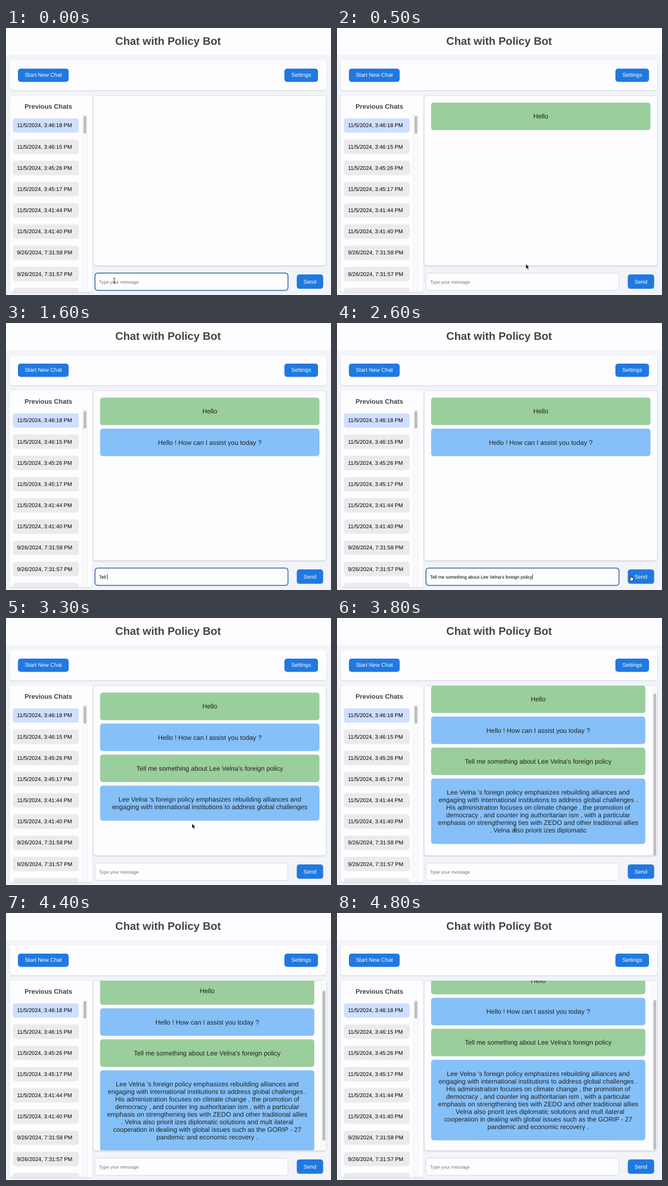
These frames come from a looping animation (600x493 px, 5 s). An HTML page:

```html
<!DOCTYPE html>
<html lang="en">
<head>
<meta charset="utf-8">
<title>Chat with Policy Bot</title>
<style>
  html, body { margin: 0; width: 100%; height: 100%; overflow: hidden; background: #f3f4f9; }
  svg { display: block; width: 600px; height: 493px; }
  text { font: 10.12px "Liberation Sans", Arial, sans-serif; white-space: pre; text-rendering: geometricPrecision; }
  .mid { text-anchor: middle; }
  .title { font-size: 20.16px; font-weight: bold; fill: #444; }
  .sub { font-size: 12.1px; font-weight: bold; fill: #444; }
  .panel { fill: #fdfcfe; filter: drop-shadow(0 1px 1.3px rgba(0, 0, 0, .14)); }
  .chat { stroke: #d3d6dc; stroke-width: .7; }
  .btn { fill: #2079e0; }
  .label { fill: #fdfcfe; }
  .item { fill: #ebeaed; }
  .item.on { fill: #cfdfff; }
  .track { fill: #faf9fb; stroke: #e9e8ec; stroke-width: .7; }
  .thumb { fill: #bdbcbf; }
  .field { fill: #fdfcfe; stroke: #d6d9e1; stroke-width: 1; }
  .field.focus { stroke: #2a5ea6; stroke-width: 1.5; }
  .typed { font-size: 8.44px; fill: #000; }
  .typed.hint { fill: #757578; }
  .msg text { font-size: 12.08px; fill: #222; }
  .user { fill: #9ace9c; }
  .bot { fill: #86c0f8; }
</style>
</head>
<body>
<svg viewBox="0 0 600 493">
  <defs>
    <clipPath id="sideClip"><rect x="0" y="125" width="160" height="363"/></clipPath>
    <clipPath id="chatClip"><rect x="161.5" y="125" width="429.7" height="313.3"/></clipPath>
  </defs>
  <rect width="600" height="493" fill="#f3f4f9"/>
  <rect width="600" height="50" fill="#fdfcfe"/>
  <text class="title mid" x="299.3" y="31.2">Chat with Policy Bot</text>

  <rect class="panel" x="6.8" y="59.3" width="585" height="55.7" rx="5"/>
  <rect class="btn" x="22" y="75" width="93.7" height="24.4" rx="5"/>
  <text class="label mid" x="68.9" y="90.4">Start New Chat</text>
  <rect class="btn" x="514" y="75" width="62" height="24.4" rx="5"/>
  <text class="label mid" x="545" y="90.4">Settings</text>

  <rect class="panel" x="6.8" y="125" width="153" height="363" rx="5"/>
  <text class="sub mid" x="78.2" y="148.6">Previous Chats</text>
  <g id="items" clip-path="url(#sideClip)"></g>
  <rect class="track" x="141" y="160.5" width="9" height="327.5"/>
  <rect class="thumb" x="143" y="162.5" width="5.4" height="32.5" rx="2.7"/>

  <rect class="panel chat" x="161" y="125" width="430.4" height="313.7" rx="5"/>
  <g clip-path="url(#chatClip)">
    <g id="log"></g>
    <g id="bar">
      <rect class="track" x="582.2" y="124" width="9.5" height="316"/>
      <rect id="thumb" class="thumb" x="584.2" width="5.2" rx="2.6"/>
    </g>
  </g>

  <rect id="field" class="field" x="164.3" y="452.4" width="356.3" height="32" rx="5"/>
  <text id="typed" class="typed" x="171.7" y="471.5"></text>
  <rect id="caret" y="463.5" width=".8" height="10" fill="#000"/>
  <rect class="btn" x="536.8" y="455" width="48.7" height="26.6" rx="5"/>
  <text class="label mid" x="561" y="471.7">Send</text>

  <g id="mouse">
    <path id="arrow" d="M0 0V9.2L2.1 7.3L3.6 10.8L5.1 10.1L3.6 6.8H6.4Z" fill="#000" stroke="#fff" stroke-width=".7"/>
    <path id="beam" d="M-2 -4.7Q0 -4.7 0 -3.4Q0 -4.7 2 -4.7M0 -3.4V3.6M-2 4.9Q0 4.9 0 3.6Q0 4.9 2 4.9M-1 1.5H1" fill="none" stroke="#222" stroke-width=".9"/>
    <path id="hand" d="M-1.8 -4.2Q-1 -5.4 -.2 -4.2V-1.4L2.8 -.8Q4 -.4 3.8 1L3 5.2H-1.2L-3.8 1.4Q-3.4 0 -1.8 1.2Z" fill="#fff" stroke="#000" stroke-width=".9"/>
  </g>
</svg>
<script>
const $ = id => document.getElementById(id);
const LOOP = 5000, STEP = 100;
const LINE = 14;

const QUESTION = "Tell me something about Lee Velna's foreign policy";
const GREETING = ["Hello ! How can I assist you today ?"];
const ANSWER = [
  "Lee Velna 's foreign policy emphasizes rebuilding alliances and",
  "engaging with international institutions to address global challenges .",
  "His administration focuses on climate change , the promotion of",
  "democracy , and counter ing authoritarian ism , with a particular",
  "emphasis on strengthening ties with ZEDO and other traditional allies",
  ". Velna also priorit izes diplomatic solutions and mult ilateral",
  "cooperation in dealing with global issues such as the GORIP - 27",
  "pandemic and economic recovery ."
];

// Time, value pairs
const GREETING_WORDS = [[1000, 0], [1100, 2], [1300, 9]];
const ANSWER_WORDS = [[3000, 0], [3100, 3], [3300, 17], [3600, 43], [3700, 51], [4100, 65], [4300, 69], [4400, 76]];
const FIRST_TYPING = [[0, 0], [200, 5]];
const SECOND_TYPING = [[1400, 0], [1600, 5], [2400, 50]];
const SCROLL = [[3700, 0], [3800, 13], [4300, 13], [4500, 25], [4700, 38.4]];

// Time, pointer kind, x, y
const MOUSE = [
  [0, "beam", 200, 466.5], [200, "beam", 360, 468], [300, "hand", 545, 470],
  [400, "arrow", 440, 452], [500, "arrow", 348.7, 435.8], [600, "beam", 310, 460],
  [700, "beam", 288, 467], [1500, ""], [2500, "beam", 470, 469],
  [2600, "hand", 543.5, 471], [2800, "arrow", 344, 379.7], [2900, "arrow", 343.5, 379.5],
  [3400, "beam", 344, 384], [3700, "beam", 328, 388], [4400, ""]
];

function ramp(points, t) {
  if (t <= points[0][0]) return points[0][1];
  for (let i = 1; i < points.length; i++) {
    const [t0, a] = points[i - 1], [t1, b] = points[i];
    if (t <= t1) return a + (b - a) * (t - t0) / (t1 - t0);
  }
  return points[points.length - 1][1];
}

function firstWords(lines, count) {
  const out = [];
  for (const line of lines) {
    if (count <= 0) break;
    const words = line.split(" ");
    out.push(words.slice(0, count).join(" "));
    count -= words.length;
  }
  return out;
}

function add(parent, tag, attrs, text = "") {
  const el = document.createElementNS("http://www.w3.org/2000/svg", tag);
  for (const key in attrs) el.setAttribute(key, attrs[key]);
  el.textContent = text;
  return parent.appendChild(el);
}

const show = (el, on) => { el.style.display = on ? "" : "none"; };

["11/5/2024, 3:46:18 PM", "11/5/2024, 3:46:15 PM", "11/5/2024, 3:45:26 PM",
 "11/5/2024, 3:45:17 PM", "11/5/2024, 3:41:44 PM", "11/5/2024, 3:41:40 PM",
 "9/26/2024, 7:31:58 PM", "9/26/2024, 7:31:57 PM", ""].forEach((label, i) => {
  const y = 166.7 + i * 39.17;
  add($("items"), "rect", { class: i ? "item" : "item on", x: 12.6, y, width: 121.8, height: 26.6, rx: 5 });
  add($("items"), "text", { x: 20.2, y: y + 16.7 }, label);
});

function drawLog(t) {
  const log = $("log");
  const messages = [];
  if (t >= 400) messages.push(["user", ["Hello"]]);
  if (t >= 1100) messages.push(["bot", firstWords(GREETING, Math.round(ramp(GREETING_WORDS, t)))]);
  if (t >= 2800) messages.push(["user", [QUESTION]]);
  if (t >= 3100) messages.push(["bot", firstWords(ANSWER, Math.round(ramp(ANSWER_WORDS, t)))]);

  const last = messages[messages.length - 1];
  const overflow = last ? Math.max(0, (last[1].length - 6) * LINE + 10) : 0;
  const scrolls = messages.length === 4 && last[1].length > 5;
  const scroll = scrolls ? ramp(SCROLL, t) : 0;
  const width = scrolls ? 395.5 : 405;

  log.textContent = "";
  let y = 137.8 - scroll;
  for (const [kind, lines] of messages) {
    const height = 36.8 + LINE * lines.length;
    const group = add(log, "g", { class: "msg" });
    add(group, "rect", { class: kind, x: 173.7, y, width, height, rx: 5 });
    lines.forEach((line, i) =>
      add(group, "text", { class: "mid", x: 173.7 + width / 2, y: y + 29.6 + LINE * i }, line));
    y += height + 6.4;
  }

  show($("bar"), scrolls);
  if (scrolls) {
    const ratio = 313 / (313 + overflow);
    $("thumb").setAttribute("y", 126.6 + scroll * ratio);
    $("thumb").setAttribute("height", 313 * ratio - 2.5);
  }
}

function drawField(t) {
  const focus = t < 400 || (t >= 1400 && t < 2800);
  const source = t < 400 ? "Hello" : QUESTION;
  const count = Math.round(ramp(t < 400 ? FIRST_TYPING : SECOND_TYPING, t));
  const value = focus ? source.slice(0, count) : "";
  const typed = $("typed");
  $("field").setAttribute("class", focus ? "field focus" : "field");
  typed.setAttribute("class", value ? "typed" : "typed hint");
  typed.textContent = value || "Type your message";
  show($("caret"), value);
  if (value) $("caret").setAttribute("x", 171.7 + typed.getComputedTextLength());
}

function drawMouse(t) {
  const [, kind, x = 0, y = 0] = MOUSE.filter(m => m[0] <= t).pop();
  for (const id of ["arrow", "beam", "hand"]) show($(id), id === kind);
  $("mouse").setAttribute("transform", `translate(${x} ${y})`);
}

let drawn = -1;
function frame() {
  const t = Math.min(4800, Math.floor(performance.now() % LOOP / STEP) * STEP);
  if (t !== drawn) {
    drawLog(t);
    drawField(t);
    drawMouse(t);
    drawn = t;
  }
  requestAnimationFrame(frame);
}
frame();
</script>
</body>
</html>
```
